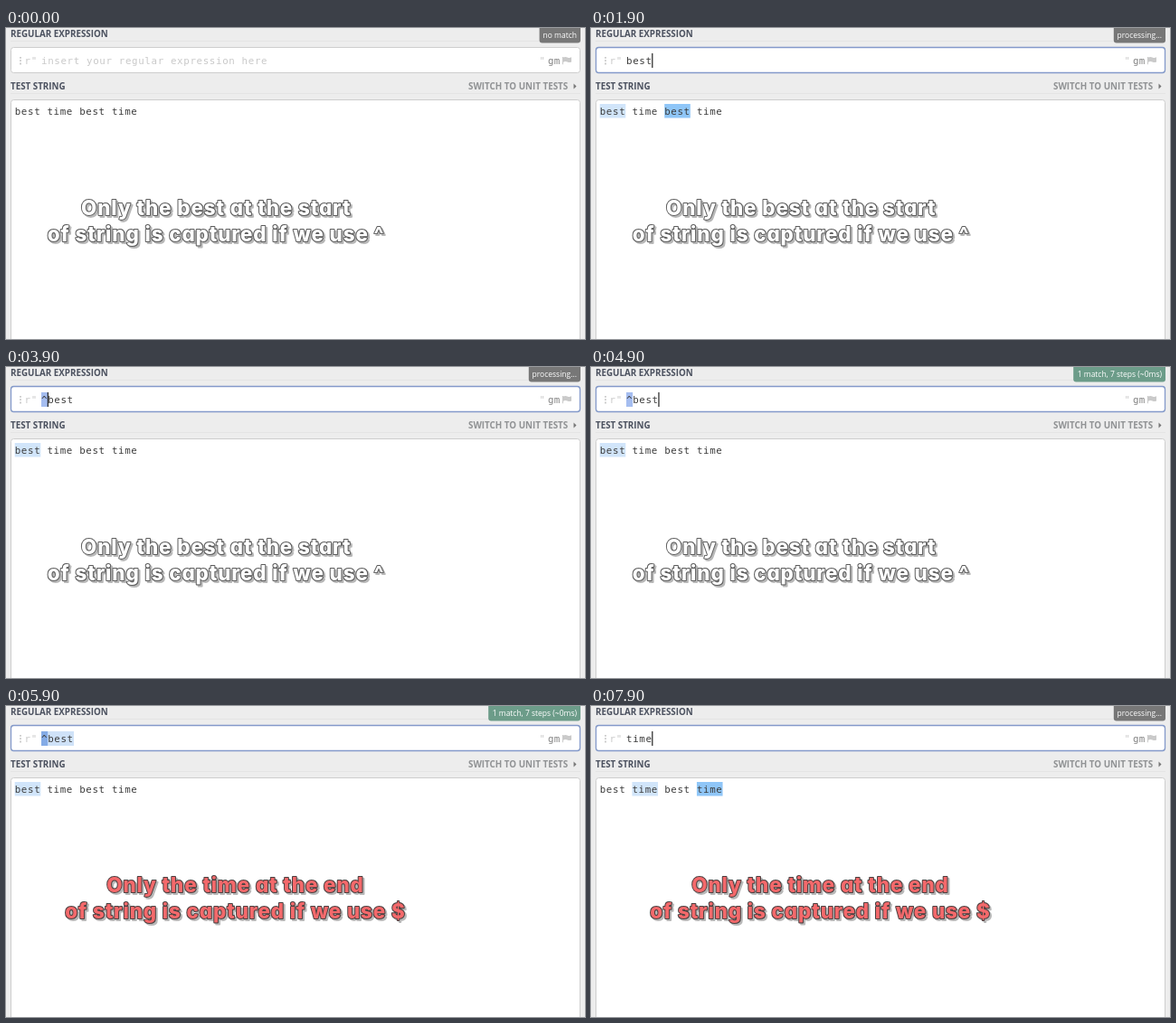
Recreate the animation shown at these times as an HTML page. Size 640 by 344 pixels, loop 8000 ms.

```html
<!DOCTYPE html>
<html lang="en">
<head>
<meta charset="utf-8">
<title>Regex anchors</title>
<style>
  html, body { margin: 0; width: 100%; height: 100%; overflow: hidden; background: #ededed; }
  svg { display: block; width: 640px; height: 344px; }
  .title { font: 700 9.8px "Open Sans", sans-serif; fill: #4b515f; }
  .switch { fill: #909294; }
  .badge { font: 400 8.5px "Open Sans", sans-serif; fill: #fff; text-anchor: end; }
  .mono { font: 10.8px "DejaVu Sans Mono", monospace; letter-spacing: .648px; fill: #3c3c3c; }
  .mono.pale { fill: #c9c9c9; }
  .mono.flags { fill: #848484; letter-spacing: .2px; }
  .panel { fill: #fff; stroke: #cdcdcd; }
  .rule { stroke: #e4e4e4; }
  .caption {
    font: 800 22.4px Inter, Lato, sans-serif;
    font-feature-settings: "cv11";
    letter-spacing: .9px;
    text-anchor: middle;
    stroke-width: 2px; stroke-linejoin: round; paint-order: stroke;
    filter: drop-shadow(2.4px 2.6px 0 #b8b8b8);
  }
</style>
</head>
<body>
<svg viewBox="0 0 640 344">
  <rect width="640" height="344" fill="#ededed"/>
  <path class="rule" d="M5 14.5H635M5 72.5H635"/>
  <text class="title" x="5" y="10.2">REGULAR EXPRESSION</text>
  <text class="title" x="5" y="67.6">TEST STRING</text>
  <text class="title switch" x="511" y="67.6">SWITCH TO UNIT TESTS</text>
  <path d="M627.5 61.5l3 3-3 3z" fill="#777"/>

  <path id="badgeBox"/>
  <text id="badge" class="badge" x="631" y="11.2"></text>

  <rect class="panel" x="5.5" y="21.5" width="629" height="28" rx="3"/>
  <rect id="focus" x="5.5" y="21.5" width="629" height="28" rx="3" fill="none" stroke="#8399ca" stroke-width="1.3"/>
  <path d="M16 32v8.500" stroke="#c4c4c4" stroke-width="1.6" stroke-dasharray="1.8 1.5"/>
  <text class="mono pale" x="20.5" y="40">r"</text>
  <text class="mono pale" x="589.5" y="40">"</text>
  <text class="mono flags" x="599" y="39.700">gm</text>
  <path d="M615 32h1v.5q2.200-1.200 4.500 0t4.500-.2v5.200q-2.200 1.200-4.500 0t-4.500 .2v2.600h-1z" fill="#cacaca"/>

  <rect id="selection" x="39" y="28" width="36" height="16" fill="#cfe2f8"/>
  <rect id="anchor" x="39" y="28" width="7.15" height="16"/>
  <text id="hint" class="mono pale" x="39" y="40">insert your regular expression here</text>
  <text id="regex" class="mono" x="39" y="40"></text>
  <rect id="caret" y="28" width="1.2" height="16" fill="#222"/>

  <rect class="panel" x="5.5" y="79.5" width="629" height="280" rx="3"/>
  <g id="hits"></g>
  <text class="mono" x="9.7" y="96">best time best time</text>

  <g id="startCaption" class="caption" fill="#fff" stroke="#5c5c5c">
    <text x="232.2" y="206.5">Only the best at the start</text>
    <text x="232.2" y="236">of string is captured if we use ^</text>
  </g>
  <g id="endCaption" class="caption" fill="#f4696b" stroke="#4a4040">
    <text x="253.5" y="205.5">Only the time at the end</text>
    <text x="253.5" y="235">of string is captured if we use $</text>
  </g>
</svg>
<script>
const LOOP = 8000, CHAR = 7.15, LEFT = 39;
const TEST = 'best time best time';
const BUSY = 'processing...', NONE = 'no match';
const BADGE_LEFT = {
  [NONE]: 589.6,
  [BUSY]: 577.8,
  '2 matches, 10 steps (~0ms)': 519.4,
  '1 match, 7 steps (~0ms)': 533.2
};

// Each step changes part of the state; caret -1 means hidden.
const STEPS = [
  [0, { regex: '', found: '', caret: -1, badge: NONE, selected: false, caption: 'start' }],
  [700, { caret: 0 }],
  [1200, { caret: -1 }],
  [1500, { regex: 'b', caret: 1, badge: BUSY }],
  [1600, { regex: 'be', found: 'b', caret: 2 }],
  [1700, { regex: 'bes', found: 'be', caret: 3 }],
  [1800, { regex: 'best', found: 'bes', caret: 4 }],
  [1900, { found: 'best' }],
  [2400, { caret: -1, badge: '2 matches, 10 steps (~0ms)' }],
  [2500, { caret: 0 }],
  [3000, { caret: -1 }],
  [3500, { caret: 0 }],
  [3700, { regex: '^best', caret: 1, badge: BUSY }],
  [3800, { found: '^best' }],
  [4300, { caret: -1 }],
  [4400, { badge: '1 match, 7 steps (~0ms)' }],
  [4800, { caret: 5 }],
  [5000, { caption: '' }],
  [5500, { caret: -1, selected: true }],
  [5900, { caption: 'end' }],
  [6100, { regex: '', caret: 0, selected: false, badge: BUSY }],
  [6200, { found: '' }],
  [6600, { caret: -1, badge: NONE }],
  [6800, { regex: 't', caret: 1, badge: BUSY }],
  [6900, { found: 't' }],
  [7100, { regex: 'ti', caret: 2 }],
  [7200, { found: 'ti' }],
  [7300, { regex: 'tim', caret: 3 }],
  [7400, { found: 'tim' }],
  [7500, { regex: 'time', caret: 4 }],
  [7600, { found: 'time' }]
];

const el = id => document.getElementById(id);
const show = (id, on) => el(id).setAttribute('visibility', on ? 'visible' : 'hidden');

function hitRects(pattern) {
  if (!pattern) return '';
  return [...TEST.matchAll(new RegExp(pattern, 'g'))].map((m, i) =>
    `<rect x="${9.7 + m.index * CHAR}" y="84" width="${m[0].length * CHAR}" height="15.5"
      fill="${i % 2 ? '#8fc6f8' : '#d1e5fa'}"/>`).join('');
}

function drawBadge(text) {
  const x = BADGE_LEFT[text];
  const color = text.includes('steps') ? '#6c9c89' : '#777';
  el('badge').textContent = text;
  el('badgeBox').setAttribute('d', `M${x} 0H635V13.5q0 3-3 3H${x + 3}q-3 0-3-3z`);
  el('badgeBox').setAttribute('fill', color);
}

function draw(s) {
  el('regex').textContent = s.regex;
  show('hint', !s.regex);
  show('selection', s.selected);
  show('anchor', s.regex[0] === '^');
  el('anchor').setAttribute('fill', s.selected ? '#84abe6' : '#a5bdf0');
  show('caret', s.caret >= 0);
  el('caret').setAttribute('x', LEFT - .4 + Math.max(0, s.caret) * CHAR);
  el('hits').innerHTML = hitRects(s.found);
  drawBadge(s.badge);
  show('startCaption', s.caption === 'start');
  show('endCaption', s.caption === 'end');
}

const begin = performance.now();
let last = -1;

function tick() {
  const t = Math.max(0, performance.now() - begin) % LOOP;
  const past = STEPS.filter(([at]) => at <= t);
  if (past.length !== last) {
    last = past.length;
    draw(Object.assign({}, ...past.map(p => p[1])));
  }
  el('focus').setAttribute('opacity', Math.min(1, Math.max(0, (t - 500) / 300)));
  requestAnimationFrame(tick);
}
tick();
</script>
</body>
</html>
```
